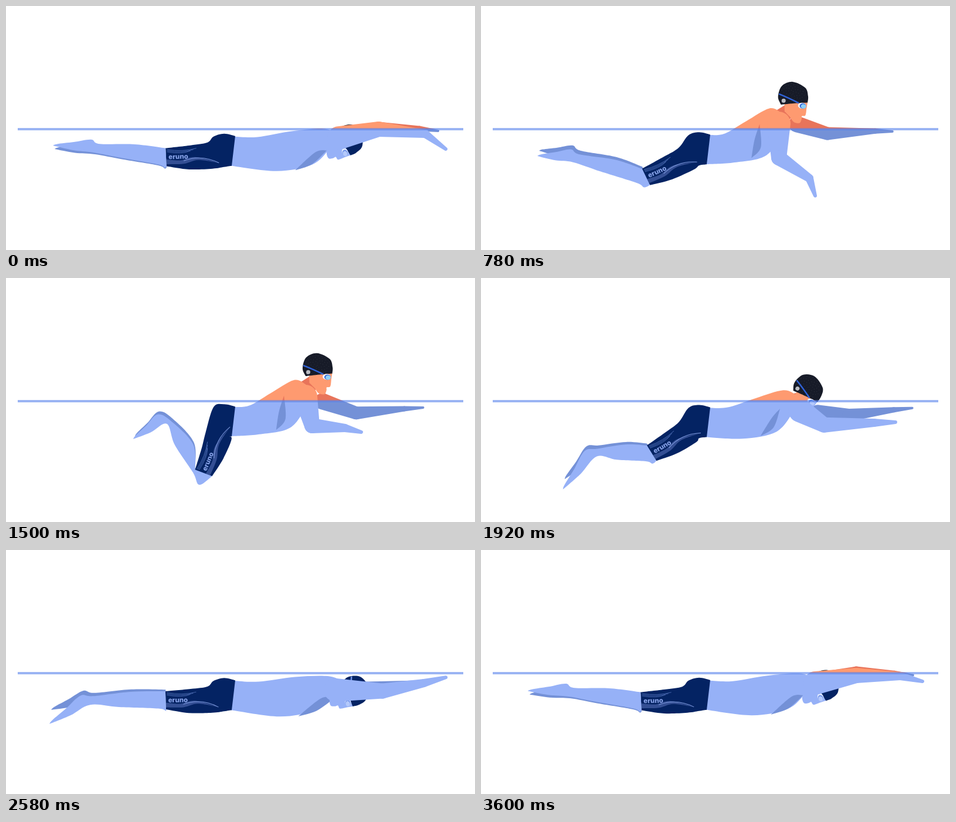
These frames come from a looping animation (800 by 418 pixels, 3720 ms). An HTML page with a canvas:

```html
<!DOCTYPE html>
<html lang="en">
<head>
<meta charset="utf-8">
<title>Breaststroke</title>
<style>
  html, body { margin: 0; overflow: hidden; background: #fff; }
  canvas { display: block; }
</style>
</head>
<body>
<canvas id="stage" width="800" height="418"></canvas>
<script>
const ctx = document.getElementById('stage').getContext('2d');
const STEP = 60, LAST = 3600, LOOP = 3720, WATER = 211;

const NAVY = '#042363';
const AIR = { skin: '#fe9a70', shade: '#e8745a', cap: '#171b28', strap: '#2f62d8', lens: '#8fd0f5', rim: '#f2f6ff', badge: '#b9bcc4' };
const SEA = { skin: '#96b1f7', shade: '#7491d7', cap: NAVY, strap: '#6f92e8', lens: '#b4c9fb', rim: '#e6eeff', badge: '#96b1f7' };

// Key moments: a time in ms, then values. Joints are x, y.
// How far the upper body is out of its glide (0) towards its highest breath (1).
const RISE = [[0, .07], [240, .4], [480, .81], [1080, 1], [1260, 1.04], [1500, .95], [1680, .86], [2280, .05], [2940, -.08]];
// knee, ankle, toe, then how much lower the far ankle and far toe are
const LEG = [
  [0, 273, 259, 150, 243, 80, 239, 3, 6],
  [480, 274, 268, 147, 249, 83, 229, 1, -1],
  [1080, 295, 319, 186, 267, 123, 285, -12, -14],
  [1500, 337, 334, 270, 243, 217, 276, -5, -5],
  [1980, 285, 294, 180, 303, 128, 366, -6, -20],
  [2280, 272, 261, 138, 269, 82, 320, -6, -38],
  [2940, 273, 260, 143, 252, 75, 278, -4, -1]
];
// shoulder, elbow, wrist, fingertips
const NEAR_ARM = [
  [0, 568, 226, 636, 211, 715, 219, 750, 245],
  [480, 524, 214, 572, 280, 592, 318, 595, 346],
  [780, 508, 201, 508, 260, 560, 295, 570, 325],
  [1080, 496, 191, 477, 251, 503, 246, 515, 243],
  [1500, 511, 203, 522, 253, 578, 257, 606, 264],
  [2280, 562, 240, 630, 248, 715, 236, 755, 227],
  [2940, 562, 238, 640, 232, 710, 220, 744, 214],
  [3600, 570, 228, 640, 215, 715, 216, 753, 225]
];
const FAR_ARM = [
  [0, 575, 222, 640, 210, 705, 210, 737, 214],
  [480, 565, 208, 610, 211, 685, 209, 711, 211],
  [1080, 520, 200, 580, 226, 665, 221, 698, 220],
  [2280, 590, 240, 640, 236, 715, 227, 746, 223],
  [2940, 580, 238, 640, 236, 700, 228, 728, 221]
];

// Cyclic cubic easing through the keys, without overshoot.
function sample(track, t) {
  const n = track.length, i = track.findLastIndex(row => row[0] <= t);
  const [a, b, c, d] = [-1, 0, 1, 2].map(k => {
    const turn = Math.floor((i + k) / n), [time, ...values] = track[(i + k + n) % n];
    return { time: time + turn * (LAST + STEP), values };
  });
  const h = c.time - b.time, s = (t - b.time) / h, r = 1 - s;
  const slope = (p, q, w, j) => {
    const [x, y, z] = [p, q, w].map(key => key.values[j]);
    return (y - x) * (z - y) > 0 ? (z - x) / (w.time - p.time) * h : 0;
  };
  return b.values.map((v, j) =>
    (1 + 2 * s) * r * r * v + s * r * r * slope(a, b, c, j) +
    s * s * (3 - 2 * s) * c.values[j] - s * s * r * slope(b, c, d, j));
}

const pairs = list => list.flatMap((v, i) => i % 2 ? [] : [[v, list[i + 1]]]);
const shift = ([x, y], dx, dy) => [x + dx, y + dy];
const mix = (p, q, s) => p.map((v, i) => v + (q[i] - v) * s);

// Places points relative to a bone: share of its length, then pixels to its right.
function along(from, to) {
  const dx = to[0] - from[0], dy = to[1] - from[1], length = Math.hypot(dx, dy);
  return (share, side) => [from[0] + dx * share - dy / length * side, from[1] + dy * share + dx / length * side];
}

// Smooth open curves joined at corners into one filled outline.
function shape(color, ...curves) {
  ctx.beginPath();
  for (const p of curves) {
    ctx.lineTo(...p[0]);
    for (let i = 1; i < p.length; i++) {
      const before = p[i - 2] || p[i - 1], [from, to] = [p[i - 1], p[i]], after = p[i + 1] || to;
      ctx.bezierCurveTo(
        from[0] + (to[0] - before[0]) / 6, from[1] + (to[1] - before[1]) / 6,
        to[0] - (after[0] - from[0]) / 6, to[1] - (after[1] - from[1]) / 6, ...to);
    }
  }
  ctx.closePath();
  ctx.fillStyle = color;
  ctx.fill();
}

function bone(color, [x1, y1], r1, [x2, y2], r2) {
  const a = Math.atan2(y2 - y1, x2 - x1);
  const o = Math.acos(Math.max(-1, Math.min(1, (r1 - r2) / Math.hypot(x2 - x1, y2 - y1))));
  ctx.beginPath();
  ctx.arc(x1, y1, r1, a + o, a - o + 2 * Math.PI);
  ctx.arc(x2, y2, r2, a - o, a + o);
  ctx.fillStyle = color;
  ctx.fill();
}

function dot(color, x, y, rx, ry = rx) {
  ctx.beginPath();
  ctx.ellipse(x, y, rx, ry, 0, 0, 2 * Math.PI);
  ctx.fillStyle = color;
  ctx.fill();
}

function stroke(color, width, from, bend, to) {
  ctx.beginPath();
  ctx.moveTo(...from);
  ctx.quadraticCurveTo(...bend, ...to);
  ctx.strokeStyle = color;
  ctx.lineWidth = width;
  ctx.stroke();
}

function arm(color, track, t, radii) {
  const joints = pairs(sample(track, t));
  for (let i = 0; i < 3; i++) bone(color, joints[i], radii[i], joints[i + 1], radii[i + 1]);
}

function leg(color, hip, knee, ankle, toe) {
  const thigh = along(knee, hip), shin = along(knee, ankle), foot = along(ankle, toe);
  const length = Math.hypot(ankle[0] - knee[0], ankle[1] - knee[1]);
  const fold = Math.hypot(hip[0] - ankle[0], hip[1] - ankle[1]) / (length + 95);
  shape(color,
    [thigh(0, -15.5), shin(.45, 15), shin(.93, 8), foot(.08, 14), foot(.5, 8), foot(.9, 3), toe],
    [toe, foot(.5, -6), foot(0, -8), shin(.6, -11), shin(.1, -14), shin((fold - 1) * .2, -18), thigh(0, 15.5)]);
}

function shorts(knee, hip, lift) {
  const thigh = along(knee, hip);
  shape(NAVY,
    [[391, 223 + lift], [372, 219 + lift], [354, 224 + lift], thigh(.75, -21), thigh(.45, -18), thigh(0, -15.5)],
    [thigh(0, 15.5), thigh(.4, 23), thigh(.82, 24), [372, 276 + lift], [385, 274 + lift]]);

  ctx.save();
  ctx.clip();
  ctx.translate(...knee);
  ctx.rotate(Math.atan2(hip[1] - knee[1], hip[0] - knee[0]) + .03);
  shape('#344f94', [[0, 4], [25, 6], [50, 1], [90, 12]], [[90, 12], [55, 6], [30, 12], [0, 12]]);
  for (let i = 0; i < 3; i++) {
    stroke('#5473bb', .8, [2, -13 + 2 * i], [28, -8 + 2 * i], [52 - 5 * i, -14 + 2 * i]);
  }
  stroke('#7f9be0', 1, [30, 7], [60, -4], [90, 12]);
  ctx.font = '800 11.5px Inter, sans-serif';
  ctx.textAlign = 'center';
  ctx.textBaseline = 'middle';
  ctx.fillStyle = '#89a4ea';
  ctx.fillText('eruno', 21, 0);
  ctx.restore();
}

function head(ink, x, y, tilt) {
  ctx.save();
  ctx.translate(x, y);
  ctx.rotate(tilt);
  shape(ink.skin, [[-13, 15], [26, 9]], [[25, 20], [24, 32], [18, 34], [18, 39], [15, 46], [5, 45], [-3, 36], [-12, 28]]);
  shape(ink.cap, [[-19, 17], [-25, 4], [-20, -15], [-2, -23.5], [20, -15], [26, -1], [26, 10]], [[26, 10], [4, 13], [-19, 17]]);
  if (ink === AIR) {
    for (let i = 0; i < 60; i++) {
      const a = i * 2.4, r = 2.6 * Math.sqrt(i);
      dot('rgba(255,255,255,.15)', r * Math.cos(a), r * Math.sin(a) - 3, .5);
    }
  }
  stroke(ink.strap, 2.5, [-24, -1], [-8, 4], [11, 12]);
  dot(ink.badge, -15, 10, 3.5);
  dot(ink.rim, 17, 16, 7, 5);
  dot(ink.strap, 18.5, 16.5, 5.5, 4.5);
  dot(ink.lens, 19.5, 17, 4.5, 3.8);
  ctx.restore();
}

function swimmer(ink, t) {
  const [rise] = sample(RISE, t), lift = -3 * rise, hip = [368, 254 + lift];
  const blend = (glide, raised) => pairs(mix(glide, raised, rise));
  const [low, high, nape, neck, chest, ribs, belly] = blend(
    [430, 225, 490, 216, 545, 213, 570, 222, 553, 250, 525, 273, 464, 284],
    [415, 218, 450, 196, 488, 173, 508, 180, 517, 205, 485, 254, 430, 267]);
  const [a, b, c, d] = blend(
    [496, 283, 533, 252, 553, 251, 526, 273],
    [459, 259, 462, 228, 470, 199, 474, 240]);
  const [x, y, turn] = mix([590, 234, 70], [528, 148, 0], rise), tilt = turn * Math.PI / 180;
  const skull = [x - 26 * Math.sin(tilt) - 4 * Math.cos(tilt), y + 26 * Math.cos(tilt) - 4 * Math.sin(tilt)];
  const limb = sample(LEG, t), [knee, ankle, toe] = pairs(limb.slice(0, 6)), [ankleDrop, toeDrop] = limb.slice(6);

  arm(ink.shade, FAR_ARM, t, [14, 11, 4.5, 2]);
  leg(ink.shade, hip, shift(knee, 0, ankleDrop / 2), shift(ankle, 2, ankleDrop), shift(toe, 3, toeDrop));
  bone(ink.shade, skull, 12, shift(nape, 10, 21), 14);
  shape(ink.skin, [[390, 224 + lift], low, high, nape, neck], [chest, ribs, belly, [384, 274 + lift]]);
  shape(ink.shade, [a, b, c], [c, d, a]);
  shorts(knee, hip, lift);
  leg(ink.skin, hip, knee, ankle, toe);
  head(ink, x, y, tilt);
  arm(ink.skin, NEAR_ARM, t, [20, 13, 7, 3]);
}

function half(ink, top, height, t) {
  ctx.save();
  ctx.beginPath();
  ctx.rect(0, top, 800, height);
  ctx.clip();
  swimmer(ink, t);
  ctx.restore();
}

function frame(now) {
  const t = Math.min(Math.floor(now % LOOP / STEP) * STEP, LAST);
  ctx.fillStyle = '#fff';
  ctx.fillRect(0, 0, 800, 418);
  half(AIR, 0, WATER, t);
  half(SEA, WATER, 418 - WATER, t);
  ctx.fillStyle = 'rgba(88,130,235,.6)';
  ctx.fillRect(20, 209, 760, 4);
  requestAnimationFrame(frame);
}
requestAnimationFrame(frame);
</script>
</body>
</html>
```
